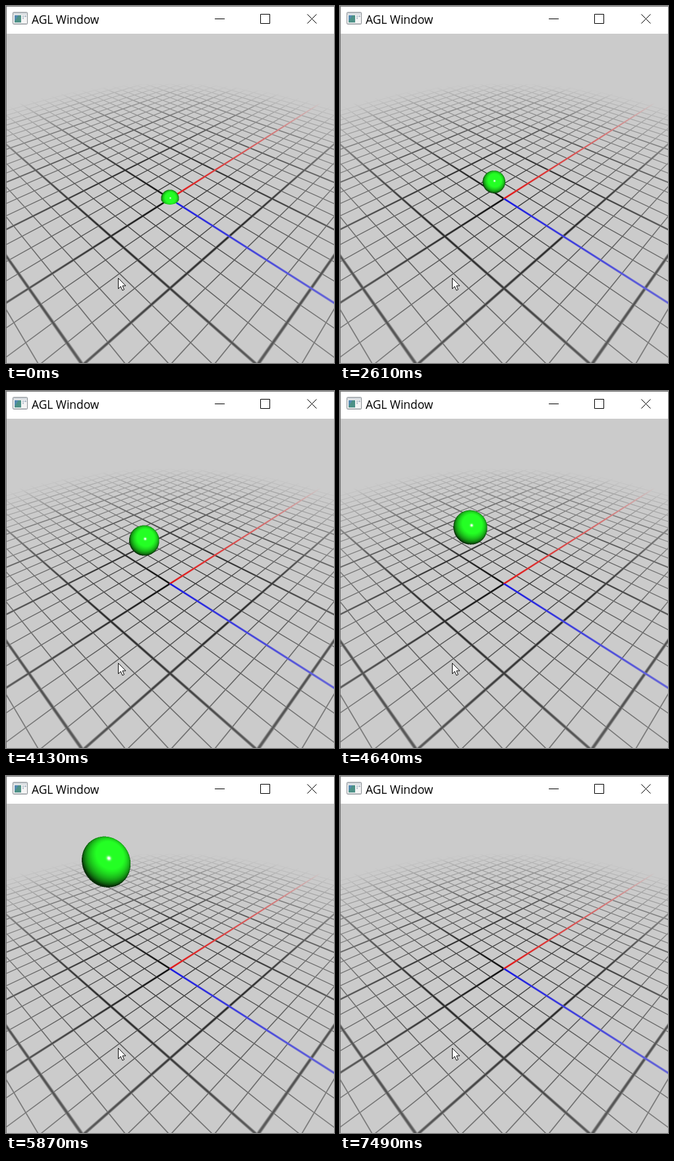
An HTML page with a canvas for the animation above (8 s loop, 498 by 541 pixels).

```html
<!DOCTYPE html>
<html lang="en">
<head>
<meta charset="utf-8">
<title>AGL Window</title>
<style>
  html, body { margin: 0; width: 100%; height: 100%; overflow: hidden; background: #cbcbcb; }
  canvas, svg { position: absolute; left: 0; top: 0; display: block; }
  text { font: 17.4px "Open Sans", "Noto Sans", sans-serif; }
</style>
</head>
<body>
<canvas id="grid" width="498" height="541"></canvas>
<canvas id="ball" width="498" height="541"></canvas>
<svg width="498" height="541" viewBox="0 0 498 541">
  <rect width="498" height="42" fill="#fff"/>
  <path d="M0 .5H498M.5 0V541" stroke="#707070"/>
  <g>
    <rect x="10.5" y="9.5" width="22" height="18" rx="1" fill="#f4f4f4" stroke="#8a8f94"/>
    <path d="M11 11.5H32" stroke="#d3d8dc" stroke-width="3"/>
    <rect x="13" y="14" width="10" height="11" fill="#4d9187"/>
    <path d="M13 14h6l-6 9z" fill="#5489b0"/>
    <path d="M25 15.5h2m1 0h3M25 18.5h2" stroke="#a9b8c6" stroke-width="2"/>
    <path d="M11 26.5H32" stroke="#cfd3d6"/>
  </g>
  <text x="39" y="27" fill="#000">AGL Window</text>
  <path d="M317 19.5H332M386.5 12.5h14v14h-14zM457.5 12.5l14 14m0-14l-14 14" fill="none" stroke="#000"/>
  <path d="M170.5 412.5v16l3.7-3.5 2.6 5.9 2.6-1.2-2.5-5.7h4.9z" fill="#fff" stroke="#111"/>
</svg>
<script>
const W = 498, H = 541, TOP = 42, CX = 249, CY = 292, FOCAL = 432;
// Camera orbiting the world origin: distance, sine and cosine of its elevation
const DIST = 15.78, SIN = 0.634, COS = 0.7733;
const RADIUS = 0.5, LIGHT = [1.1, 2.2, 0];

const context = id => document.getElementById(id).getContext('2d');
const smoothstep = (a, b, x) => {
  const k = Math.min(1, Math.max(0, (x - a) / (b - a)));
  return k * k * (3 - 2 * k);
};
const dot = (a, b) => a[0] * b[0] + a[1] * b[1] + a[2] * b[2];
const normalize = a => { const n = Math.sqrt(dot(a, a)); return a.map(v => v / n); };

// World [x, z] on the ground below a screen point, or null above the horizon
function ground(px, py) {
  const a = (px - CX) / FOCAL, b = (CY - py) / FOCAL;
  const drop = SIN - b * COS;
  if (drop <= 0.001) return null;
  const t = DIST * SIN / drop;
  const right = t * a, near = DIST * COS - t * (b * SIN + COS);
  return [(right - near) * Math.SQRT1_2, (right + near) * Math.SQRT1_2];
}

const lineOffset = (v, step) => Math.abs(v - Math.round(v / step) * step);
const minorLine = (v, px) => 0.8 * (1 - smoothstep(0, 0.01 + 1.1 * px, lineOffset(v, 1)));
const majorLine = (v, px) => 1 - smoothstep(0.01, 0.06 + 0.9 * px, lineOffset(v, 4));

function drawGrid() {
  const ctx = context('grid'), image = ctx.createImageData(W, H);
  for (let y = TOP; y < H; y++) for (let x = 0; x < W; x++) {
    const p = ground(x + 0.5, y + 0.5);
    const fade = p ? 1 - Math.hypot(...p) / 20 : 0;
    let color = [203, 203, 203];
    if (fade > 0) {
      const px = ground(x + 1.5, y + 0.5), py = ground(x + 0.5, y + 1.5);
      const size = [0, 1].map(i => Math.hypot(px[i] - p[i], py[i] - p[i]));
      const blend = (ink, alpha) => {
        color = color.map((c, i) => c + (ink[i] - c) * alpha * fade);
      };
      const major = p.map((v, i) => majorLine(v, size[i]));
      const minor = Math.max(...p.map((v, i) => minorLine(v, size[i])));
      const onRed = Math.abs(p[1]) < 2 && p[0] > 0;
      const onBlue = Math.abs(p[0]) < 2 && p[1] > 0;
      const redAlpha = onRed ? major[1] : 0, blueAlpha = onBlue ? major[0] : 0;
      const black = Math.max(minor, onBlue ? 0 : major[0], onRed ? 0 : major[1]);
      blend([0, 0, 0], black * (1 - Math.max(redAlpha, blueAlpha)));
      blend([228, 12, 12], redAlpha);
      blend([12, 12, 228], blueAlpha);
    }
    image.data.set([...color, 255], (y * W + x) * 4);
  }
  ctx.putImageData(image, 0, 0);
}

// Colour of the ball along the ray through a screen point, or null on a miss
function shade(px, py, center) {
  const dir = normalize([(px - CX) / FOCAL, (CY - py) / FOCAL, -1]);
  const along = dot(dir, center);
  const disc = along * along - dot(center, center) + RADIUS * RADIUS;
  if (disc < 0) return null;
  const hit = dir.map(v => v * (along - Math.sqrt(disc)));
  if (DIST * SIN + hit[1] * COS + hit[2] * SIN < 0) return null; // under the ground
  const normal = hit.map((v, i) => (v - center[i]) / RADIUS);
  const light = normalize(LIGHT.map((v, i) => v - hit[i]));
  const facing = dot(normal, light);
  const mirror = normal.map((v, i) => 2 * facing * v - light[i]);
  const diffuse = Math.min(1, 0.18 + Math.max(0, facing));
  const specular = Math.max(0, -dot(mirror, dir)) ** 80;
  return [0.14, 1, 0.14].map(v => 255 * Math.min(1, v * diffuse + specular));
}

const ballContext = context('ball');
function drawBall([right, up, near]) {
  const center = [right, up * COS - near * SIN, up * SIN + near * COS - DIST];
  const scale = -FOCAL / center[2], reach = Math.ceil(RADIUS * scale * 1.2 + 3);
  const left = Math.floor(CX + center[0] * scale) - reach;
  const top = Math.floor(CY - center[1] * scale) - reach;
  const size = 2 * reach, image = ballContext.createImageData(size, size);
  for (let y = 0; y < size; y++) for (let x = 0; x < size; x++) {
    const sum = [0, 0, 0];
    let hits = 0;
    for (const dy of [0.25, 0.75]) for (const dx of [0.25, 0.75]) {
      const color = shade(left + x + dx, top + y + dy, center);
      if (color) { hits++; color.forEach((v, i) => sum[i] += v); }
    }
    if (hits) image.data.set([...sum.map(v => v / hits), hits * 63.75], (y * size + x) * 4);
  }
  ballContext.clearRect(0, 0, W, H);
  ballContext.putImageData(image, left, top);
}

// Moments at which the window repaints
const STEPS = [0, 1130, 1250, 1400, 1550, 1700, 1850, 1970, 2120, 2240, 2360, 2480, 2610, 2730,
  2850, 2970, 3090, 3210, 3330, 3450, 3600, 3750, 3890, 4010, 4130, 4250, 4370, 4520, 4640,
  4790, 4910, 5060, 5180, 5330, 5480, 5600, 5730, 5870, 5990, 6590, 6710, 6830, 6950, 7100,
  7220, 7340, 7490];
const LOOP = 8000, RESET = 5990;

// Two straight flights from the origin, as [right, up, towards the viewer] per second
function position(time) {
  const [start, velocity] = time < RESET
    ? [1000, [-0.274, 1.628, 1.264]]
    : [6570, [1.85, -0.61, 0.33]];
  return velocity.map(v => v * Math.max(0, time - start) / 1000);
}

let shown = -1;
const begin = performance.now();
function tick() {
  const time = (performance.now() - begin) % LOOP;
  const step = STEPS.findLast(s => s <= time);
  if (step !== shown) drawBall(position(shown = step));
  requestAnimationFrame(tick);
}

drawGrid();
tick();
</script>
</body>
</html>
```
